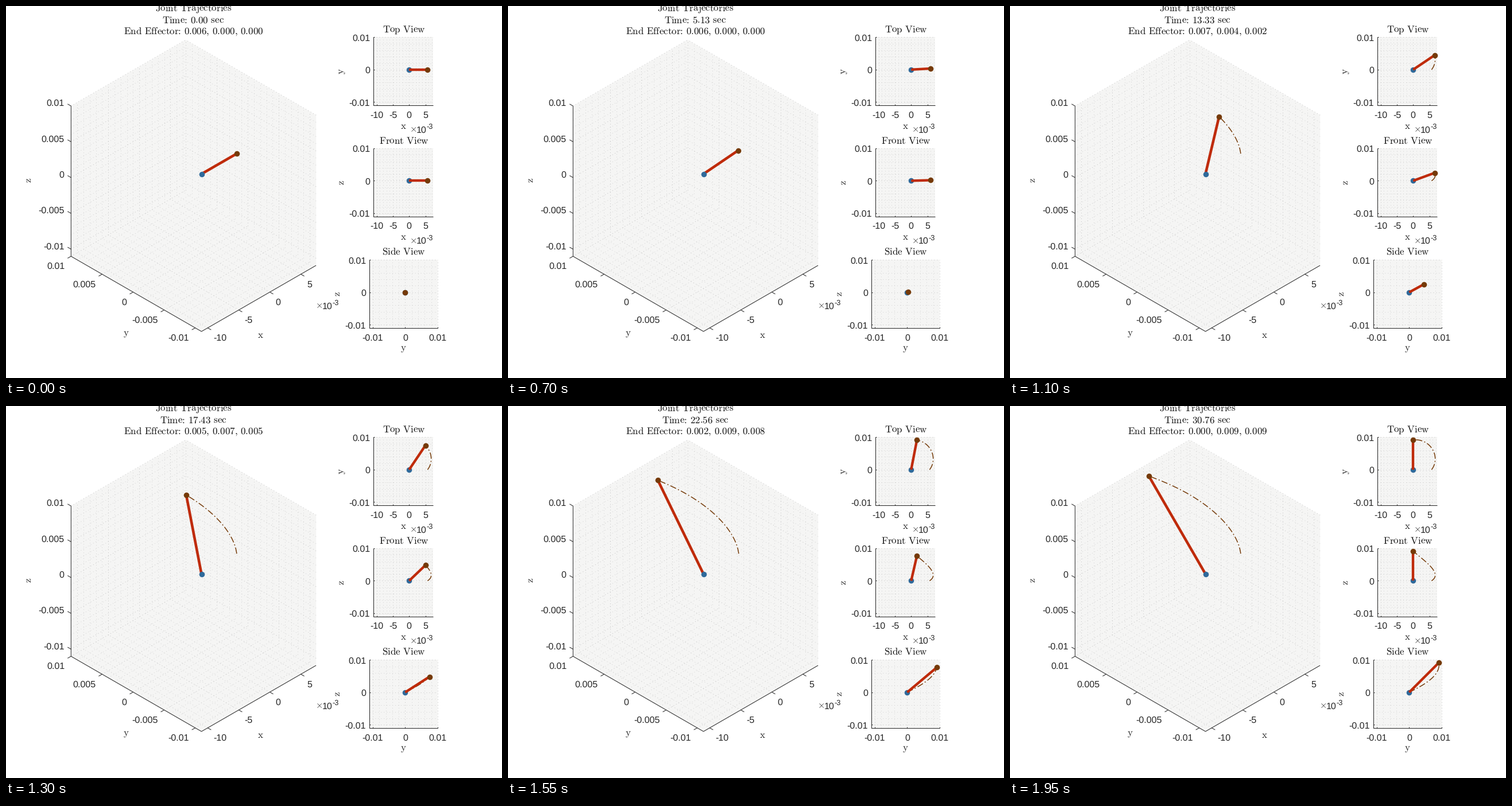
Write a matplotlib script that moves like this. It is 864 by 648 pixels and loops after 2 s.

```python
import numpy as np
import matplotlib.pyplot as plt
from matplotlib.animation import FuncAnimation
from matplotlib.collections import LineCollection

plt.rcParams["mathtext.fontset"] = "cm"
plt.rcParams["font.family"] = "Liberation Sans"
plt.rcParams["text.hinting"] = "no_hinting"

W, H = 864, 648
HOLD, MOVES = 10, 30            # resting frames, then moving frames
DT = 30.76 / MOVES              # seconds of robot time per move
INK, WALL = "#262626", "#f5f5f4"
RED, BROWN, BLUE = "#bf2b0b", "#753a08", "#2f6a9b"
LO, HI, XMAX = -11, 10, 7.45    # axis limits, in units of 0.001
PX = 5.65                       # pixels per unit in the flat views

fig = plt.figure(figsize=(W / 72, H / 72), dpi=72, facecolor="white")
ax = fig.add_axes([0, 0, 1, 1])
ax.set(xlim=(0, W), ylim=(H, 0))
ax.axis("off")


def tex(s):
    return r"$\text{%s}$" % s


def title(x, y, s):
    return ax.text(x, y, tex(s), size=17, ha="center", va="baseline", color="#111111")


def letter(x, y, s, rotation=0):
    ax.text(x, y, tex(s), size=17, ha="center", va="center",
            rotation=rotation, color=INK)


def number(x, y, s, ha):
    ax.text(x, y + 5.7, s, size=16, ha=ha, va="baseline", color=INK)


def exponent(x, y):
    ax.text(x + 5, y, r"$\times$", size=16, ha="center", va="center", color=INK)
    number(x + 11, y, "10", "left")
    ax.text(x + 28.5, y - 1, "-3", size=12.8, va="baseline", color=INK)


def segments(segs, color, width, dash="solid", z=1):
    ax.add_collection(LineCollection(segs, colors=color, linewidths=width,
                                     linestyles=[dash], zorder=z))


def grid(lines):
    """Dotted lines given as (segment, is_major)."""
    for major, color in ((False, "#d0d0d0"), (True, "#bdbdbd")):
        segs = [s for s, m in lines if m == major]
        segments(segs, color, 0.9, (0, (1.1, 4.4)))


def iso(x, y, z):
    return 340.5 + 10.82 * (x - y), 292.6 - 6.235 * (x + y) - 12.47 * z


def pose(n):
    """Joint-space quintic: yaw 0-90, pitch 0-45 degrees, reach 5.67-12.9."""
    u = n / MOVES
    s = u**3 * (10 - 15 * u + 6 * u * u)
    yaw, pitch, reach = s * np.pi / 2, s * np.pi / 4, 5.67 + 7.23 * s
    return (reach * np.cos(pitch) * np.cos(yaw),
            reach * np.cos(pitch) * np.sin(yaw),
            reach * np.sin(pitch))


def build_cube():
    corners = [(LO, HI, HI), (XMAX, HI, HI), (XMAX, LO, HI),
               (XMAX, LO, LO), (LO, LO, LO), (LO, HI, LO)]
    ax.fill(*zip(*[iso(*c) for c in corners]), color=WALL, lw=0, zorder=0)

    lines = []
    for v in range(-10, 11):
        pairs = [((XMAX, v, LO), (XMAX, v, HI)), ((LO, v, LO), (XMAX, v, LO)),
                 ((XMAX, LO, v), (XMAX, HI, v)), ((LO, HI, v), (XMAX, HI, v))]
        if v < XMAX:
            pairs += [((v, HI, LO), (v, HI, HI)), ((v, LO, LO), (v, HI, LO))]
        lines += [((iso(*a), iso(*b)), v % 5 == 0) for a, b in pairs]
    grid(lines)

    edge = [iso(*c) for c in ((LO, HI, HI), (LO, HI, LO), (LO, LO, LO), (XMAX, LO, LO))]
    segments([edge], INK, 1, z=2)

    ticks = []
    for v in (-10, -5, 0, 5, 10):
        label = f"{v / 1000:g}"
        x, y = iso(LO, HI, v)
        ticks.append(((x, y), (x - 6, y - 3.4)))
        number(x - 11.5, y - 5.7, label, "right")
        x, y = iso(LO, v, LO)
        ticks.append(((x, y), (x - 6, y + 3.4)))
        number(x - 11, y + 16.5, label, "right")
        if v < XMAX:
            x, y = iso(v, LO, LO)
            ticks.append(((x, y), (x + 6, y + 3.4)))
            number(x + 10.3, y + 16.8, str(v), "left")
    segments(ticks, INK, 1, z=2)

    letter(443.5, 573.5, "x")
    letter(209, 571, "y")
    letter(40, 304, "z", 90)
    exponent(540, 522)


def build_flat(ox, oy, name, across, up, wide):
    """Flat view with its data origin at pixel (ox, oy)."""
    right = HI if wide else XMAX
    x0, x1 = ox + LO * PX, ox + right * PX
    y0, y1 = oy - HI * PX, oy - LO * PX
    ax.fill([x0, x1, x1, x0], [y0, y0, y1, y1], color=WALL, lw=0, zorder=0)

    step, major = (2, 10) if wide else (1, 5)
    lines = [(((ox + v * PX, y1), (ox + v * PX, y0)), v % major == 0)
             for v in range(-10, 11, step) if v <= right]
    lines += [(((x0, oy - v * PX), (x1, oy - v * PX)), v % 10 == 0)
              for v in range(-10, 11, 2)]
    grid(lines)
    segments([[(x0, y0), (x0, y1), (x1, y1)]], INK, 1, z=2)

    ticks = []
    for v in (-10, 0, 10):
        y = oy - v * PX
        ticks.append(((x0, y), (x0 + 1.8, y)))
        number(x0 - 6, y + 0.7, f"{v / 1000:g}", "right")
    for v in (-10, 0, 10) if wide else (-10, -5, 0, 5):
        x = ox + v * PX
        ticks.append(((x, y1), (x, y1 - 1.8)))
        number(x, y1 + 16, f"{v / 1000:g}" if wide else str(v), "center")
    segments(ticks, INK, 1, z=2)

    title(693, oy - 64.7, name)
    letter(692.5, y1 + 36.5, across)
    letter(x0 - 55.5, oy + 3, up, 90)
    if not wide:
        exponent(704, y1 + 42)


def flat(ox, oy, i, j):
    return lambda *p: (ox + PX * p[i], oy - PX * p[j])


class Arm:
    """Link, joint, tip and dash-dot trail in one projection."""

    def __init__(self, project, width, joint_z):
        self.project = project
        self.trail, = ax.plot([], [], color=BROWN, lw=1.5, zorder=4,
                              dashes=(7.3, 2.5, 1.3, 2.5), dash_capstyle="butt")
        self.link, = ax.plot([], [], color=RED, lw=width, zorder=5,
                             solid_capstyle="butt")
        self.base = project(0, 0, 0)
        ax.plot(*self.base, "o", ms=9.6, mew=0, color=BLUE, zorder=joint_z)
        self.tip, = ax.plot([], [], "o", ms=9.6, mew=0, color=BROWN, zorder=7)

    def show(self, n):
        x, y = self.project(*pose(n))
        self.link.set_data([self.base[0], x], [self.base[1], y])
        self.tip.set_data([x], [y])
        self.trail.set_data(*self.project(*pose(np.linspace(0, n, 4 * n + 1))))


VIEWS = [(702.3, 110.8, "Top View", "x", "y", False),
         (702.3, 304.4, "Front View", "x", "z", False),
         (695.4, 498.7, "Side View", "y", "z", True)]

build_cube()
arms = [Arm(iso, 4.6, 6)]
for view in VIEWS:
    build_flat(*view)
    i, j = "xyz".index(view[3]), "xyz".index(view[4])
    arms.append(Arm(flat(view[0], view[1], i, j), 4.4, 4.5))

title(326.5, 10, "Joint Trajectories")
clock = title(326.5, 30, "")
effector = title(326.5, 50, "")


def update(frame):
    n = max(0, frame - HOLD + 1)
    for arm in arms:
        arm.show(n)
    x, y, z = (v / 1000 for v in pose(n))
    clock.set_text(tex(f"Time: {n * DT:.2f} sec"))
    effector.set_text(tex(f"End Effector: {x:.3f}, {y:.3f}, {z:.3f}"))
    return []


anim = FuncAnimation(fig, update, frames=HOLD + MOVES, interval=50,
                     repeat=True, repeat_delay=0, init_func=lambda: update(0))
plt.show()
```
